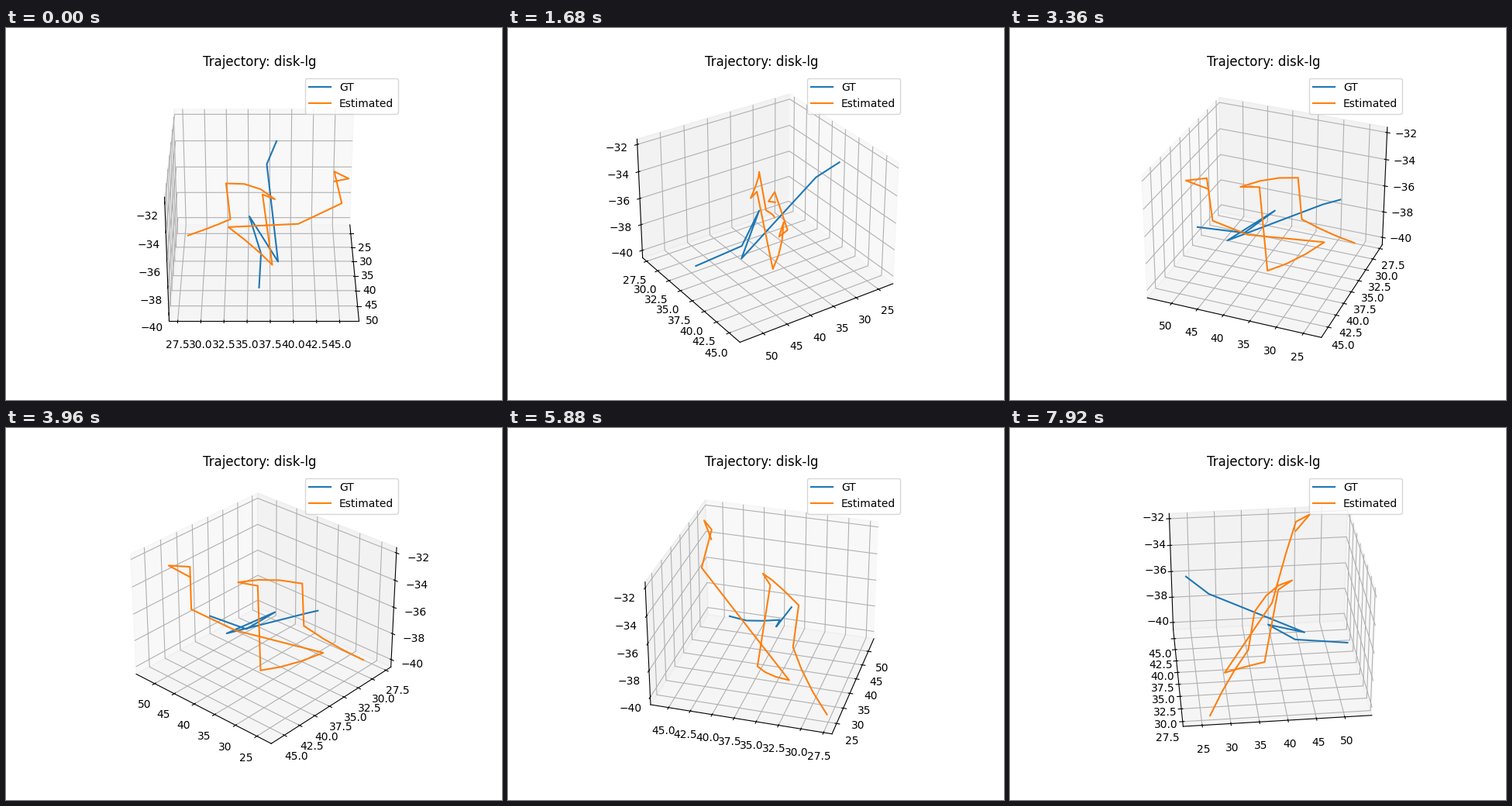
Recreate the animation shown at these times as a matplotlib script. Size 640 px wide and 480 px high, loop 8 s.

```python
import matplotlib.pyplot as plt
import numpy as np
from matplotlib.animation import FuncAnimation

LOOP_MS = 8000
TICK_MS = 40
TICKS_PER_STEP = 3   # the camera moves every 120 ms
DEG_PER_STEP = 4


def arc(start, end, lift=0.0, n=4):
    """Path from start to end, bowed sideways and lifted in the middle."""
    s = np.linspace(0, 1, n)[:, None]
    start, end = np.array(start), np.array(end)
    bow = np.array([-0.2, 0.3, lift])
    return start + (end - start) * s + 4 * s * (1 - s) * bow


ground_truth = np.array([
    (23.80, 38.26, -33.63), (27.67, 37.14, -34.62), (45.21, 38.37, -38.32),
    (37.96, 35.19, -36.48), (43.12, 36.49, -38.17), (52.68, 36.29, -38.56),
])

estimated = np.vstack([
    arc((26.53, 27.88, -40.40), (34.07, 33.00, -37.52)),
    arc((35.14, 32.59, -34.59), (42.77, 38.01, -34.22), lift=0.34),
    (40.01, 36.66, -34.43),
    arc((37.75, 37.76, -40.24), (29.77, 32.70, -39.04), lift=-0.1),
    (39.60, 40.63, -36.70),
    (43.02, 45.28, -34.46),
    (44.63, 44.32, -31.85),
    (47.48, 45.78, -31.79),
    (44.59, 44.38, -32.56),
])

fig = plt.figure(figsize=(6.4, 4.8), dpi=100)
ax = fig.add_subplot(projection="3d")
ax.plot(*ground_truth.T, label="GT")
ax.plot(*estimated.T, label="Estimated")
ax.set(xlim=(21.69, 54.78), ylim=(26.57, 47.09), zlim=(-40.58, -31.61))
ax.set_title("Trajectory: disk-lg", x=0.498)
ax.legend(loc="upper right")


def update(tick):
    ax.view_init(elev=30, azim=DEG_PER_STEP * (tick // TICKS_PER_STEP))
    return ax.lines


anim = FuncAnimation(fig, update, frames=LOOP_MS // TICK_MS,
                     interval=TICK_MS, repeat=True, repeat_delay=0)
plt.show()
```
